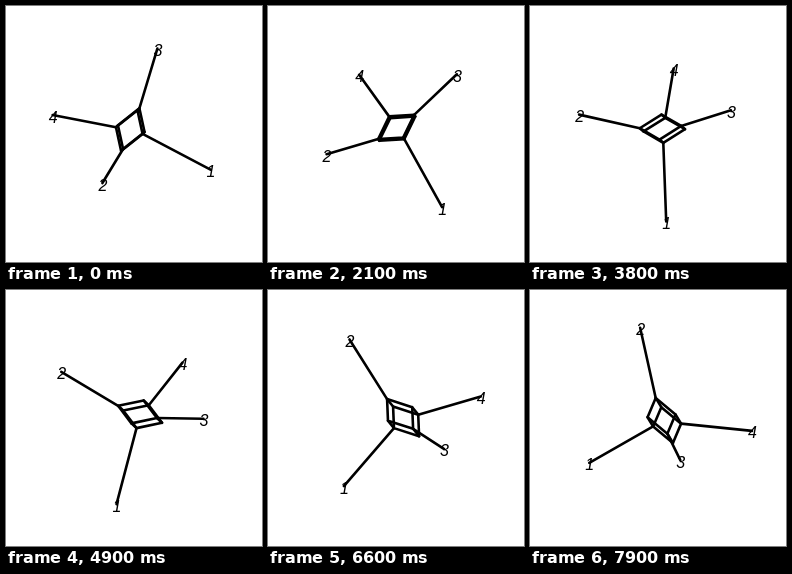
These frames come from a looping animation (256x256 px, 8 s). An HTML page with a canvas:

```html
<!DOCTYPE html>
<html>
<head>
<meta charset="utf-8">
<style>
html, body { margin: 0; width: 100%; height: 100%; overflow: hidden; background: #fff; }
canvas { display: block; }
</style>
</head>
<body>
<canvas id="stage" width="256" height="256"></canvas>
<script>
const ctx = document.getElementById('stage').getContext('2d');
const LOOP = 8000, STEP = 100, SPEED = 20; // ms, ms, degrees per second

// Each coordinate swings as mean + size * cos(angle - phase).
const orbits = {
  center: [[128.5, 6.6, 130], [128, -6.2, 45]],
  diag14: [[0, 28, 162], [0, -25, 74.5]],
  diag23: [[7.5, 34, 75], [-3, 39, 165]],
  depth:  [[1.3, 4.7, 134], [6.1, 4.6, 205]]
};
const tips = [
  [[131.5, -75.5, 170], [157, 59, 83.5]],
  [[116, -67, 73], [108, -71, 166.5]],
  [[139, 62, 78.5], [106, 65, 167.5]],
  [[131, 91, 158], [139.5, -78, 67]]
];

const cos = deg => Math.cos(deg * Math.PI / 180);
const at = (orbit, angle) =>
  orbit.map(([mean, size, phase]) => mean + size * cos(angle - phase));
const add = (p, q, k = 1) => [p[0] + k * q[0], p[1] + k * q[1]];

function path(points, closed) {
  ctx.beginPath();
  points.forEach(p => ctx.lineTo(...p));
  if (closed) ctx.closePath();
  ctx.stroke();
}

function draw(time) {
  const angle = SPEED * time / 1000;
  const [center, d14, d23, depth] =
    Object.values(orbits).map(orbit => at(orbit, angle));

  ctx.fillStyle = '#fff';
  ctx.fillRect(0, 0, 256, 256);
  ctx.strokeStyle = ctx.fillStyle = '#000';
  ctx.lineWidth = 2.6;
  ctx.lineCap = ctx.lineJoin = 'round';

  // Corners in order 1, 2, 4, 3 around each face.
  const face = side => {
    const mid = add(center, depth, side / 2);
    return [add(mid, d14, -.5), add(mid, d23, -.5), add(mid, d14, .5), add(mid, d23, .5)];
  };
  const front = face(1), back = face(-1);
  path(front, true);
  path(back, true);
  front.forEach((p, i) => path([p, back[i]]));

  const roots = [front[0], back[1], back[3], front[2]];
  ctx.font = 'italic 16px "Liberation Sans", Arial, sans-serif';
  ctx.textAlign = 'center';
  tips.forEach((orbit, i) => {
    const tip = at(orbit, angle);
    // Slight perspective bend of the first arm.
    if (i === 0) tip[0] += 4 * cos(2 * angle - 250);
    path([roots[i], tip]);
    ctx.fillText(i + 1, tip[0] + .5, tip[1] + 7.5);
  });
}

const start = performance.now();
function tick() {
  const time = (performance.now() - start) % LOOP;
  draw(Math.floor(time / STEP) * STEP);
  requestAnimationFrame(tick);
}
tick();
</script>
</body>
</html>
```
